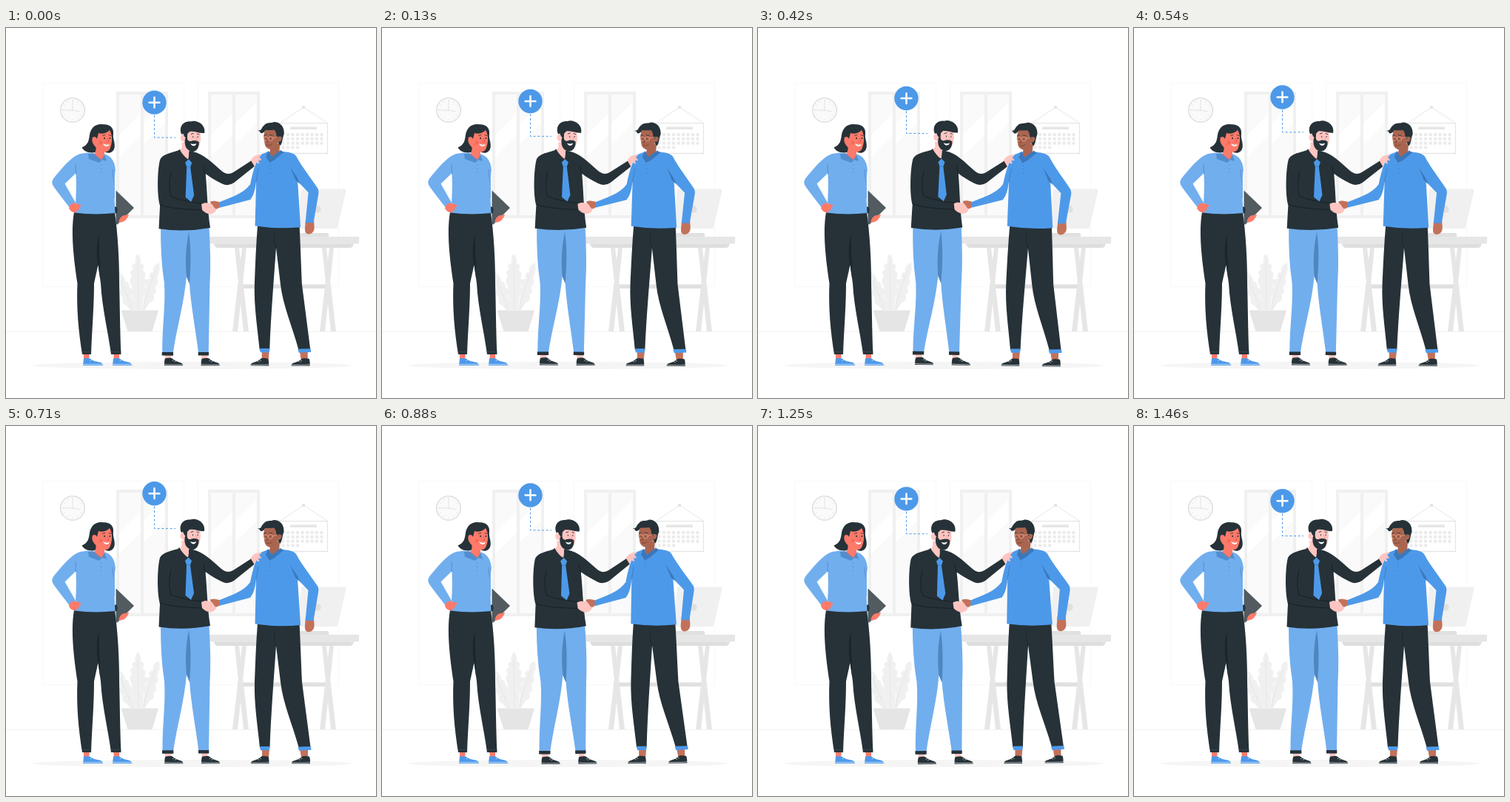
Write an HTML page that moves like this. It is 500 px wide and 500 px high and loops after 1.5 s.

```html
<!DOCTYPE html>
<html lang="en">
<head>
<meta charset="utf-8">
<style>
  html, body { margin: 0; width: 100%; height: 100%; overflow: hidden; background: #fff; }
  svg { display: block; width: 100vw; height: 100vh; }
  .blue { fill: #4d99e9; } .sky { fill: #71aeee; } .dark { fill: #263238; } .shade { fill: #3b78bb; }
  .rose { fill: #fd7a6a; } .pink { fill: #ffc5c1; } .brown { fill: #aa6550; } .tan { fill: #c4715a; }
  .line { fill: none; stroke-linecap: round; stroke-linejoin: round; }
</style>
</head>
<body>
<svg viewBox="0 0 500 500">
  <defs>
    <g id="window">
      <path fill="#f0f0f0" d="M0 0H70V171H0z"/>
      <path fill="#fafafa" d="M4 4H33V167H4zM37 4H66V167H37z"/>
      <path fill="#fff" d="M4 59 33 30V58L4 87zM37 43 66 14V42L37 71z"/>
    </g>
    <g id="trestle" fill="#e6e6e6">
      <path d="M2 297H8L-4 410H-11zM-8 297H-2L11 410H4z"/>
    </g>
    <g id="shoe">
      <path d="M1 .5C4-.5 8-.5 10 0L16 4 23 6.500C25 7.500 25 9 25 10H0C0 6 0 3 1 .5z"/>
      <path class="line" stroke="#fff" stroke-width=".6" d="M.3 8.400C8 9.200 17 8.600 24.500 8.800M11 3.500 13 2.200M13.500 5 15.500 3.600"/>
    </g>
  </defs>

  <g id="room">
    <path class="line" stroke="#f5f5f5" stroke-width=".7" d="M50.500 74.500H240.500V349.500H50.500zM259.500 74.500H449.500V349.500H259.500z"/>
    <path stroke="#ebebeb" stroke-width=".7" d="M0 410.300H500"/>
    <use href="#window" x="149" y="86"/>
    <use href="#window" x="273" y="86"/>

    <circle cx="90" cy="111" r="16.300" fill="#fafafa" stroke="#e0e0e0" stroke-width="1.600"/>
    <circle cx="90" cy="111" r="13" fill="none" stroke="#dcdcdc" stroke-width="1.800" stroke-dasharray=".6 6.207" stroke-dashoffset=".3"/>
    <path class="line" stroke="#dcdcdc" stroke-width=".8" d="M90 98V111L100 113M90 111H77"/>

    <path class="line" stroke="#e0e0e0" stroke-width=".8" d="M371 128 402 107 434 128"/>
    <circle cx="402.300" cy="107" r="1.900" fill="#e0e0e0"/>
    <path fill="#fff" stroke="#e6e6e6" stroke-width="1.300" d="M370 128.600H434.500V169.500H370z"/>
    <path fill="#e6e6e6" d="M384 133.500H420V137H384z"/>
    <g id="days" fill="#ebebeb"></g>

    <path fill="#f0f0f0" d="M399 217.500H457Q460 217.500 459.400 220.500L448.500 268Q447.800 271 445 271H394z"/>
    <circle cx="421" cy="245" r="4.800" fill="#e0e0e0"/>
    <path fill="#e0e0e0" d="M390 277H434Q436 277 436 279V282H390z"/>
    <path fill="#e0e0e0" d="M320 346.500H435V352H320z"/>
    <use href="#trestle" x="317"/>
    <use href="#trestle" x="435"/>
    <path fill="#e6e6e6" d="M274 282H477V291.500H274z"/>
    <path fill="#dedede" d="M281 291.500H470Q469 297 464 297H287Q282 297 281 291.500z"/>

    <path fill="#f0f0f0" d="M178 305C174 311 174 314 175 319 171 317 169 321 172 327 168 326 167 331 170 337 166 338 167 343 170 348L174 381H184L187 350C191 345 191 340 187 338 190 332 188 328 185 328 187 321 186 318 182 319 183 314 182 310 178 305z"/>
    <path fill="#f0f0f0" d="M207 317C199 321 198 325 199 330 194 330 192 334 195 339 189 339 187 344 190 349 185 351 184 356 187 361L184 381H188L194 371C200 370 201 365 199 361 204 358 204 353 201 350 207 345 206 339 204 337 208 331 208 325 207 317z"/>
    <path fill="#f0f0f0" d="M153 330C151 341 152 347 155 351 152 354 153 360 158 364 156 369 158 374 163 375L167 381H175L171 362C173 357 171 352 167 351 167 345 164 342 161 343 161 338 159 334 153 330z"/>
    <path class="line" stroke="#e2e2e2" stroke-width=".7" d="M178 316 179 381M202 328C196 346 188 364 186 381M155 340C160 355 167 368 171 381"/>
    <path fill="#e5e5e5" d="M155.500 381.500H206L197.500 410H164.500z"/>
    <ellipse cx="251.500" cy="456" rx="215.500" ry="5" fill="#f5f5f5"/>
  </g>

  <g id="woman">
    <path class="sky" d="M141 205 147 207V229L141 240z"/>
    <path fill="#515b60" d="M148.500 219.500 173 243 150.500 265.500Q149 266 148.500 264z"/>
    <ellipse class="dark" cx="148" cy="246" rx="2.500" ry="4.500"/>
    <path class="rose" d="M152.500 261C154 256 157 253 161 253L166 252C164 258 161 262 153 263z"/>
    <path class="rose" d="M105 438H113L112 448H105zM145 438H153V448H146z"/>
    <g class="blue">
      <path d="M105 446.500C108 446 111 446 113 446.500L119 450 128 452Q131 453.500 131 456H104z"/>
      <path d="M145 446.500C148 446 151 446 153 446.500L159 450 167 452Q170 453.500 170.500 456H144z"/>
    </g>
    <path class="line" stroke="#fff" stroke-width=".6" d="M104.500 454.500H130M144.500 454.500H170M114 449.800 116 448.500M154 449.800 156 448.500"/>
    <path class="dark" d="M92 249H147C151 279 153 310 153 345 154 378 154 411 155.500 441H142C138 410 130 380 128 345L124.500 320 119 345C119 378 116 410 115 441H103C98 410 95 378 96.500 345 92 315 87 276 92 249z"/>
    <path fill="#1a2429" d="M126 278C122 290 122 306 124.500 320L127 338C127 316 125 300 126 278z"/>
    <path class="line" stroke="#435057" stroke-width=".5" d="M103 437.500H115M142 437.500H155"/>
    <path class="sky" d="M111 168.500 133 170.500C141 172 147 179 148 192 147 200 146 208 146 218L147.500 250Q120 253 92 249.500L95 236 87 244C80 235 72 225 64.500 214.500 61 209 62 206 66 201 76 189 88 174 100 170z"/>
    <path fill="#fff" d="M79.500 210.500 94.500 196C95 210 95 222 94 236z"/>
    <path class="rose" d="M87 239C89 237 92 236 94 237L101 239Q102 241 99 242.500L98 246Q95 250 91 249 86 247 85 243z"/>
    <path class="line" stroke="#4d85bf" stroke-width=".7" d="M94.500 197 94 184M146.500 207C145 203 144 198 144 191"/>
    <path class="dark" d="M131 130.300C140 129.500 146 135 145 143 144 150 148 155 146.500 162 145 168 140 170 135 168L127 163C122 171 107 170 102.500 161.500 111 158 112 152 113 144 115 134 122 129 131 130.300z"/>
    <path class="rose" d="M121 157 133 162V173L129 179 119 171C122 166 122 162 121 157z"/>
    <path class="rose" d="M125 142C132 144 137 141 140 138 144 145 144 154 141 162 138 170 129 168 124 163 118 159 115 153 117 148 119 146 122 147 123 150z"/>
    <path class="shade" opacity=".6" d="M111 170 119 170 129 178 133 171 136 180 130 178 126 182 112 177z"/>
    <path class="line" stroke="#3b78bb" stroke-width="1" stroke-dasharray=".1 5" d="M128.500 185V197"/>
    <ellipse class="dark" cx="133" cy="149" rx=".9" ry="1.300"/><ellipse class="dark" cx="140.500" cy="149" rx=".8" ry="1.200"/>
    <path class="line" stroke="#263238" stroke-width=".8" d="M130.500 145.500 134 144.500M139 144.500 142 145.500"/>
    <path class="line" stroke="#c9503f" stroke-width=".7" d="M137 149 139 154 136 154.500"/>
    <path fill="#fff" d="M131 156C134 158 137 158 140 157.300 138 161 133 161 131 156z"/>
    <circle cx="128" cy="155" r="2.500" fill="#f25f50" opacity=".6"/>
  </g>

  <g id="men">
    <path class="pink" d="M215 440H224L223 449H215zM264 440H272L273 449H265z"/>
    <g class="dark">
      <use href="#shoe" x="214.300" y="446.300"/><use href="#shoe" x="264" y="446.300"/>
    </g>
    <path class="sky" d="M209 270H274.500C276 298 277 322 275.500 346L274 440H260.500C256 405 250 375 248 345L244 336C241 372 231 405 226 440H211.500C211 405 216 375 214 345 210 320 209 295 209 270z"/>
    <path fill="#4f86bf" d="M247 276C243 295 242 315 244 336L248 346C250 320 250 295 247 276z"/>
    <path class="dark" d="M211 438.200H226.300V442.800H211zM260 438H274.300V442.500H260z"/>

    <g>
      <path class="tan" d="M346 436H356L355 448H346zM397 436H408L408 448H399z"/>
      <g class="dark">
        <use href="#shoe" transform="translate(355.500 446.300) scale(-.98 1)"/>
        <use href="#shoe" transform="translate(411 446.300) scale(-1 1)"/>
      </g>
      <path class="dark" d="M340 266H396.500C398 295 399 325 400 346L411.500 434H395.500C387 403 374 374 371 346L365 297C362 340 358 390 356.500 435H343C340 405 335 375 336 345 337 318 338 292 340 266z"/>
      <path class="line" stroke="#1a2429" stroke-width=".8" d="M365 297C362 290 362 284 363 278"/>
      <path class="blue" d="M343 433H356.800L355.800 438.300H344zM394.500 433.500 412 433 412.500 437.800 396 438.700z"/>
      <path class="tan" d="M405 259H416C416 266 418 271 415 275Q412 279 407 278 403 276 404 269z"/>
      <path class="blue" d="M354 167 375 167C383 168 389 169 392 173 400 188 413 204 421.500 217Q423 221 422 225L415.500 263H404.500L408.500 222 394 207 398 269Q367 272 336.500 267.500L338 206C337 217 335 226 330 232L288 243 286.500 236C303 229 321 224 330 211 333 196 337 180 344 171z"/>
      <path class="shade" d="M384 188 394 203 397 210.500 391 205z"/>
      <path class="line" stroke="#3b78bb" stroke-width=".8" d="M338 207 341 190"/>
      <path class="brown" d="M358 156H370L369 168Q366 175 360 176L356 169z"/>
      <path class="dark" d="M340 138.500C346 139 344 135 349 131 352 127 358 129 362 127 370 127 376 133 375.500 143 373 148 374 154 370.500 159L364 150 350 139C347 143 343 143 343 140z"/>
      <path class="brown" d="M350 138C355 138 360 138 364 137.500L367 147C370 144 374 147 372 151 371 154 368 154 367 154 367 160 362 164 357 164 351 163 349 158 349 153 347 148 348 143 350 138z"/>
      <path class="dark" d="M363 136 374 140 374 148Q372 146 369 146.500L367 149C364 146 366 141 363 139z"/>
      <path class="shade" d="M354 166 359 174 371 165 375 168 363 178 356 182 351 174z"/>
      <path class="line" stroke="#3b78bb" stroke-width="1.200" stroke-dasharray=".1 5" d="M357 185V196"/>
      <g class="line" stroke="#f0a58c" stroke-width=".7">
        <circle cx="350.900" cy="149.500" r="2.700"/><circle cx="357.500" cy="149.500" r="3"/>
        <path d="M360.500 148.500 368 147"/>
      </g>
      <path class="line" stroke="#263238" stroke-width=".8" d="M349 145 351.500 144.500M356 144.500 360 145M351.400 149.300V150M357 149.300V150"/>
      <path class="line" stroke="#6f3522" stroke-width=".7" d="M353.500 150 352 154 354 154.500M352 158C355 159.500 358 158.500 359 157"/>
    </g>

    <path class="pink" d="M330 180C332 176 334 173 338 172L345 170.500Q346 172 342 174L345 178Q344 180 341 178L342 183Q340 184 338 181L335 187z"/>
    <path class="dark" d="M235 165 252 167C267 170 277 181 291 193Q299 200 307 195L331 179.500 335.500 187 308 209Q300 214.500 292 210.500C283 206 276 202 269.500 197 272 222 272 246 276 270Q241 276.500 206.500 271.500L208 240C204 228 204 193 208 178 212 170 224 169 235 165z"/>
    <path class="line" stroke="#141c20" stroke-width=".8" d="M269 198 267 187M223 195C220 207 220 218 223 228 235 233 251 236 264 237M208 239C221 244 240 245 264 246"/>
    <path class="pink" d="M237 155H247V177L244 177C239 174 235 170 235 165 238 163 238 159 237 155z"/>
    <path class="dark" d="M234 164C238 171 242 175 246 178L241 182C236 177 232 171 232 167zM246 178 248 166 253 168 251 180z"/>
    <path class="blue" d="M242 182 246.500 177.500 251 182 249 188 254 226 250 235 242.500 229 244 188z"/>
    <path class="line" stroke="#3b78bb" stroke-width=".7" d="M244 187.500H249"/>
    <path class="pink" d="M241 138 261 138C264 146 263 154 261 159 257 166 247 166 242 160L241 154C237 154 234 150 236 146 238 143 240 144 241 146z"/>
    <path class="dark" d="M237 144C233 135 238 126 249 126.500 257 123.500 270 130 268 142 261 143 256 139 248 140L245 143 244.500 151 241 147 239 143z"/>
    <path class="dark" d="M242 149 244.500 149C245 153 248 154 251 152.500 255 151.500 258 152 260.500 154 261 163 256 168 250 167 243 165 240 158 242 149z"/>
    <path fill="#fff" d="M249 156C252 157.500 255 157 257 156 256.500 160 251 161 249 156z"/>
    <path class="line" stroke="#263238" stroke-width=".9" d="M250 143.500 253 142.500M258 143 260.500 144M252.500 146.700V148M259 146.700V148"/>
    <path class="line" stroke="#ef9a96" stroke-width=".7" d="M256 147 258 151.500 255.500 152"/>

    <path class="pink" d="M264 238C268 236 271 236 275 237L282 240Q285 242 284 246 282 251 276 251.500 270 251 265 246z"/>
    <path class="tan" d="M276 234.500C280 233 284 234 288 235V242.500Q285 246 282 243.500L279 239 276.500 237z"/>
  </g>

  <g id="badge">
    <path fill="none" stroke="#4d99e9" stroke-dasharray="3 2.700" d="M200.500 118.500V148.600H229"/>
    <circle class="blue" cx="200.500" cy="101.200" r="16.200"/>
    <path class="line" stroke="#fff" stroke-width="2.500" d="M200.500 94.300V108.100M193.600 101.200H207.400"/>
  </g>
</svg>
<script>
  const LOOP = 1500, PHASE = 40;
  const byId = id => document.getElementById(id);
  const men = byId('men'), badge = byId('badge');

  // Three full calendar weeks and a short last one.
  for (let i = 0, cells = ''; i < 31; i++) {
    const x = 372.5 + i % 9 * 6.5, y = 142 + Math.floor(i / 9) * 5.8;
    cells += `<rect x="${x}" y="${y}" width="4" height="4"/>`;
    byId('days').innerHTML = cells;
  }

  // Triangle wave from 0 up to 1 and back over one loop.
  const triangle = p => 1 - Math.abs(1 - 2 * (p % 1));

  function draw(now) {
    const p = (now + PHASE) / LOOP;
    const sway = 2 * triangle(p + .25) - 1;
    men.setAttribute('transform', `rotate(${sway} 314 291)`);
    badge.setAttribute('transform', `translate(0 ${-10 * triangle(p)})`);
  }

  let start;
  function tick(now) {
    start ??= now;
    draw(now - start);
    requestAnimationFrame(tick);
  }
  draw(0);
  requestAnimationFrame(tick);
</script>
</body>
</html>
```
